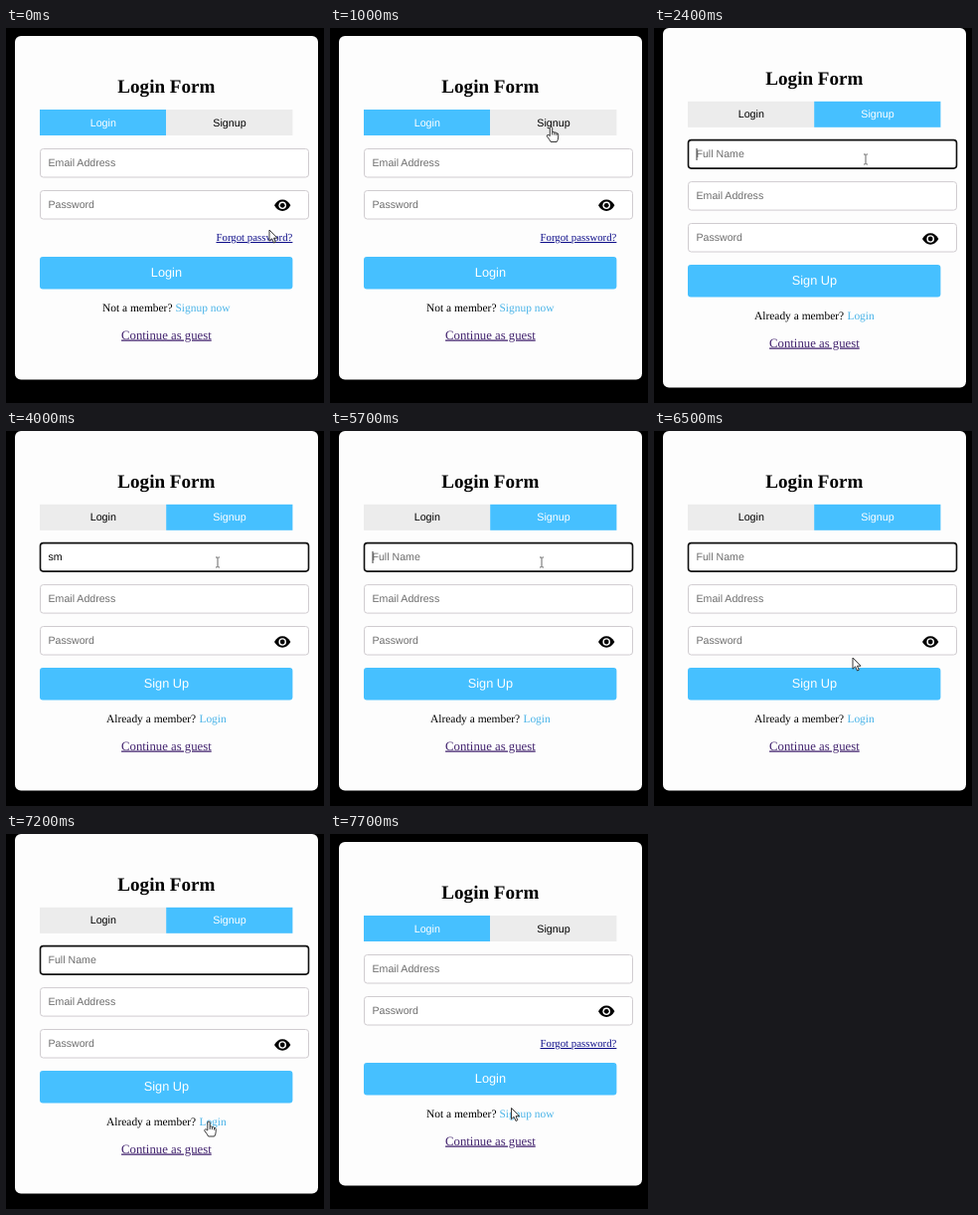
Recreate the animation shown at these times as an HTML page. Size 320 px wide and 377 px high, loop 8000 ms.

```html
<!DOCTYPE html>
<html lang="en">
<head>
<meta charset="utf-8">
<title>Login Form</title>
<style>
  html, body { margin: 0; width: 100%; height: 100%; overflow: hidden; background: #000; }
  svg { display: block; width: 100%; height: 100%; }
  text { white-space: pre; text-rendering: geometricPrecision; }
  .serif { font-family: "Liberation Serif", serif; }
  .sans { font-family: "Liberation Sans", sans-serif; }
</style>
</head>
<body>
<svg id="stage" viewBox="0 0 320 377">
  <g id="login"></g>
  <g id="signup"></g>
  <g id="pointer">
    <path id="arrow" d="M0 0V11.2L2.6 8.8L4.5 13L6.3 12.2L4.5 8.2H8Z" fill="#fff" stroke="#222" stroke-width=".9"/>
    <path id="hand" d="M-1.2 9V1Q-1.2 0 0 0T1.2 1V5.2Q2.5 4.4 3.4 5.6Q4.8 5 5.5 6.3Q7.2 6 7.2 7.8V10.5Q7 13 5.7 15H-.4Q-1.6 12.5-4 9.8Q-4.8 8.2-3.4 7.9Q-2.4 7.8-1.2 9ZM1.2 5.2V8M3.4 5.6V8.2M5.5 6.3V8.6" fill="#fff" stroke="#222" stroke-width=".9"/>
    <path id="beam" d="M-2-5H-.6L0-4.4L.6-5H2M0-4.4V4.4M-2 5H-.6L0 4.4L.6 5H2" fill="none" stroke="#555" stroke-width=".9"/>
  </g>
</svg>
<script>
const LOOP = 8000, STEP = 100;
const BLUE = '#46c0ff', LINK = '#4ab4e8', BORDER = '#d0ccd0';
const $ = id => document.getElementById(id);

const text = (str, x, y, size, fill = '#000', opts = '', family = 'sans') =>
  `<text class="${family}" x="${x}" y="${y}" font-size="${size}" fill="${fill}" ${opts}>${str}</text>`;
const middle = 'text-anchor="middle"';
const box = (x, y, w, h, fill, rx = 0, opts = '') =>
  `<rect x="${x}" y="${y}" width="${w}" height="${h}" rx="${rx}" fill="${fill}" ${opts}/>`;

const field = (label, y, id = '') =>
  box(34.5, y + .5, 270, 28.5, '#fff', 3, `stroke="${BORDER}" ${id && `id="${id}Box"`}`) +
  text(label, 42.5, y + 17.8, 10.6, '#6d6d6d', id && `id="${id}Text"`);

const eye = y => `<g transform="translate(278.2 ${y})">
  <path d="M-8.2 0Q-5-5.7 0-5.7T8.2 0Q5 5.7 0 5.7T-8.2 0Z"/>
  <circle r="3.8" fill="#fff"/><circle r="2.4"/></g>`;

// Everything shared by both panels, measured from the card's own layout
function panel({ cardY, top, active, fields, buttonY, button, ask, askX, link, linkX }) {
  const tab = (label, i) =>
    box(34 + 127.2 * i, top + 82, 127.2, 26, i === active ? BLUE : '#ececec') +
    text(label, 97.8 + 127.2 * i, top + 98.5, 10.7, i === active ? '#fff' : '#000', middle);
  return box(9, cardY, 305, 361.4 - 2 * cardY, '#fdfdfd', 6) +
    text('Login Form', 161.4, top + 65.2, 19.1, '#000', middle + ' font-weight="bold"', 'serif') +
    tab('Login', 0) + tab('Signup', 1) + fields +
    box(34, buttonY, 254.4, 32.4, BLUE, 3) +
    text(button, 161.4, buttonY + 20.3, 12.75, '#fff', middle) +
    text(ask, askX, buttonY + 55.2, 11.45, '#000', '', 'serif') +
    text(link, linkX, buttonY + 55.2, 11.45, LINK, '', 'serif') +
    text('Continue as guest', 161.4, buttonY + 82.5, 12.75, '#43246f', middle + ' text-decoration="underline"', 'serif');
}

$('login').innerHTML = panel({
  cardY: 8, top: 0, active: 0, buttonY: 230, button: 'Login',
  ask: 'Not a member?', askX: 97, link: 'Signup now', linkX: 170.5,
  fields: field('Email Address', 121) + field('Password', 163) + eye(178.3) +
    text('Forgot password?', 288.4, 214, 10.8, '#10108a', 'text-anchor="end" text-decoration="underline"', 'serif')
});
$('signup').innerHTML = panel({
  cardY: 0, top: -8.2, active: 1, buttonY: 238, button: 'Sign Up',
  ask: 'Already a member?', askX: 101, link: 'Login', linkX: 194.4,
  fields: field('Full Name', 112.1, 'name') + field('Email Address', 154.1) + field('Password', 196) + eye(212) +
    '<path id="caret" d="M0 121V133" stroke="#222" stroke-width=".9"/>'
});

// time, x, y of the pointer's hot spot
const PATH = [
  [0, 265, 203], [200, 254, 176], [400, 232, 118], [600, 222.5, 99.5],
  [1100, 222.5, 99.5], [1500, 213, 132], [5700, 213, 132],
  [6300, 200, 228], [6500, 200, 228], [7100, 184.5, 273],
  [7200, 204, 289], [7300, 204, 289], [7700, 182.5, 275.5], [LOOP, 182.5, 275.5]
];
// time, typed value, caret shown
const TYPING = [
  [0, '', 0], [1500, '', 1], [2000, '', 0], [2400, '', 1], [2900, 's', 1], [3100, 'sm', 1],
  [4000, 'sm', 0], [4500, 'sm', 1], [5000, 'sm', 0], [5300, 'sm', 1], [5500, 's', 1],
  [5700, '', 1], [6200, '', 0], [6700, '', 1], [7200, '', 0]
];
const CARET_X = { '': 43, s: 48.6, sm: 57.6 };

function pointerAt(t) {
  const i = PATH.findIndex(p => p[0] > t);
  const [t0, x0, y0] = PATH[i - 1], [t1, x1, y1] = PATH[i];
  const k = (t - t0) / (t1 - t0);
  return [x0 + (x1 - x0) * k, y0 + (y1 - y0) * k];
}

function pointerKind(x, y, signup) {
  const within = (a, b) => y >= a && y <= b;
  const shift = signup ? 8 : 0;
  const fieldTops = signup ? [112, 154, 196] : [121, 163];
  if (fieldTops.some(top => within(top, top + 29))) return 'beam';
  const onTab = within(82 - shift, 108 - shift);
  const onButton = within(230 + shift, 262 + shift);
  const onLink = x > (signup ? 194 : 170) && x < 226 && within(276 + shift, 288 + shift + 2);
  return onTab || onButton || onLink ? 'hand' : 'arrow';
}

const show = (id, on) => $(id).setAttribute('visibility', on ? 'visible' : 'hidden');

function render(t) {
  const signup = t >= 1100 && t < 7300;
  $('login').style.display = signup ? 'none' : '';
  $('signup').style.display = signup ? '' : 'none';

  const [, value, caret] = TYPING.filter(s => s[0] <= t).pop();
  const focused = t >= 1500;
  $('nameBox').setAttribute('stroke', focused ? '#101010' : BORDER);
  $('nameBox').setAttribute('stroke-width', focused ? 1.6 : 1);
  $('nameText').textContent = value || 'Full Name';
  $('nameText').setAttribute('fill', value ? '#000' : '#6d6d6d');
  $('caret').setAttribute('transform', `translate(${CARET_X[value]})`);
  show('caret', caret && signup);

  const [x, y] = pointerAt(t);
  // The hover shape is not refreshed until the pointer leaves the swapped link
  const kind = t >= 7700 ? 'arrow' : pointerKind(x, y, signup);
  $('pointer').setAttribute('transform', `translate(${x} ${y})`);
  for (const id of ['arrow', 'hand', 'beam']) show(id, id === kind);
}

const start = performance.now();
function tick() {
  const t = (performance.now() - start) % LOOP;
  render(Math.floor(t / STEP) * STEP);
  requestAnimationFrame(tick);
}
tick();
</script>
</body>
</html>
```
